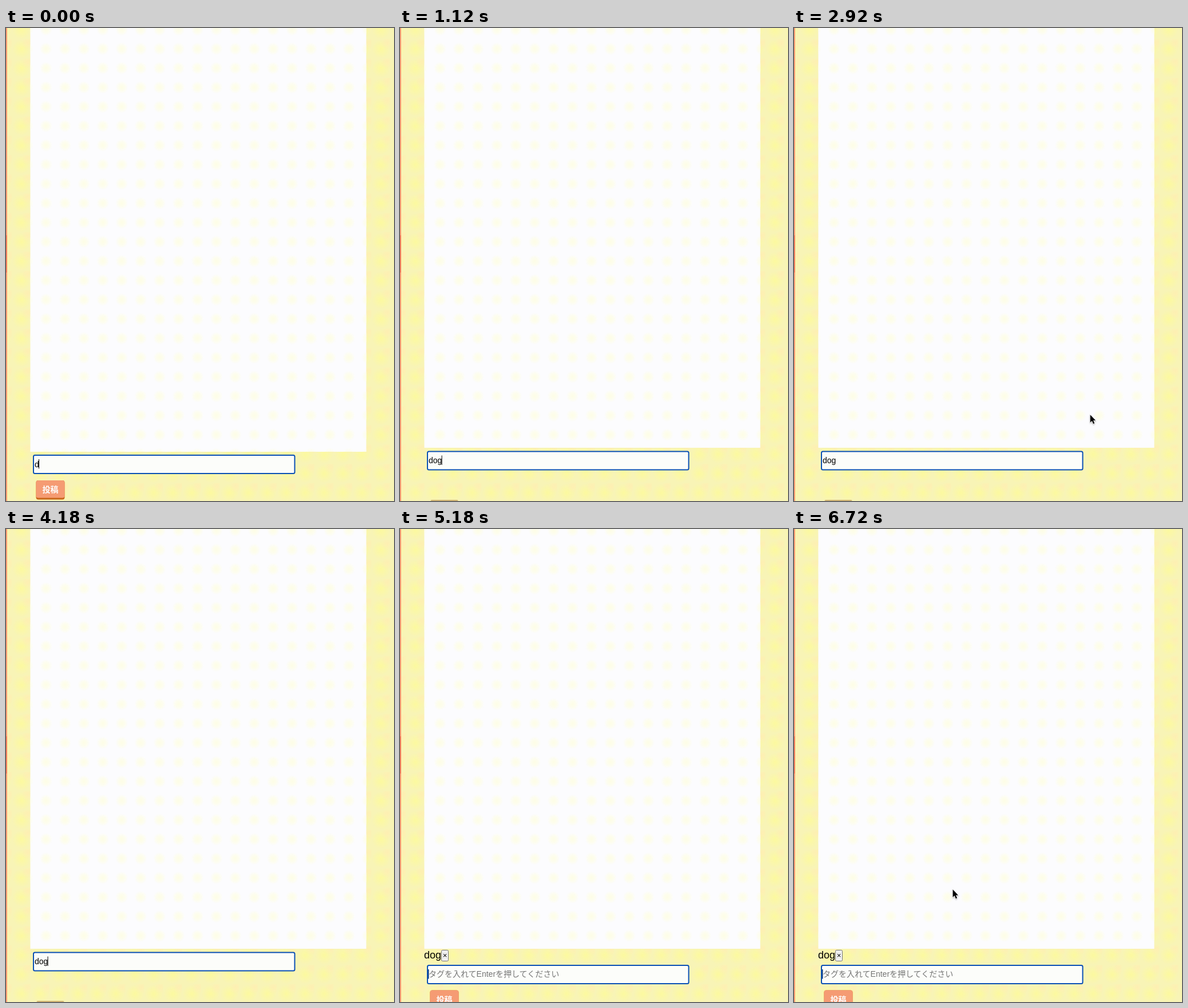
These frames come from a looping animation (678 px wide and 826 px high, 8000 ms). An HTML page:

```html
<!DOCTYPE html>
<html lang="ja">
<head>
<meta charset="utf-8">
<style>
  html, body { margin: 0; width: 100%; height: 100%; overflow: hidden; background: #f8f4b6; }
  svg { display: block; width: 678px; height: 826px; }
  text { font: 14px "Liberation Sans", "Noto Sans CJK JP", "Noto Sans CJK", sans-serif; }
  #tag text { font-size: 18px; }
  #tag .x { font-size: 13px; text-anchor: middle; }
  #button text { font-weight: bold; fill: #fff; text-anchor: middle; }
</style>
</head>
<body>
<svg viewBox="0 0 678 826">
  <defs>
    <radialGradient id="yellow">
      <stop offset="0" stop-color="#fcf99f"/>
      <stop offset="1" stop-color="#fcf99f" stop-opacity="0"/>
    </radialGradient>
    <radialGradient id="peach">
      <stop offset="0" stop-color="#feefb2"/>
      <stop offset="1" stop-color="#feefb2" stop-opacity="0"/>
    </radialGradient>
    <radialGradient id="pale">
      <stop offset="0" stop-color="#fdfde6"/>
      <stop offset=".5" stop-color="#fdfdee"/>
      <stop offset="1" stop-color="#fdfdee" stop-opacity="0"/>
    </radialGradient>
    <pattern id="page" x="10" y="19.5" width="33.07" height="33.7" patternUnits="userSpaceOnUse">
      <circle cx="17" cy="17" r="16" fill="url(#yellow)"/>
      <circle cx="28" cy="6" r="11" fill="url(#peach)"/>
    </pattern>
    <pattern id="dots" x="53.5" y="19.5" width="33.07" height="33.7" patternUnits="userSpaceOnUse">
      <circle cx="16.5" cy="16.8" r="11" fill="url(#pale)"/>
    </pattern>
    <filter id="shadow" x="-50%" y="-50%" width="200%" height="200%">
      <feDropShadow dx="0" dy="1.2" stdDeviation="1" flood-opacity=".35"/>
    </filter>
  </defs>

  <rect width="678" height="826" fill="#f8f4b6"/>
  <rect width="678" height="826" fill="url(#page)"/>
  <rect width="2" height="826" fill="#f79b73"/>
  <rect y="362" width="2" height="65" fill="#f17d5c"/>

  <rect class="card" x="42.5" width="587" fill="#fcfcfe"/>
  <rect class="card" x="42.5" width="587" fill="url(#dots)"/>

  <g id="tag">
    <text x="42" y="750">dog</text>
    <rect x="72.5" y="735.5" width="12" height="19" rx="2" fill="#efefef" stroke="#767676"/>
    <text class="x" x="78.5" y="749">×</text>
  </g>

  <g id="field">
    <rect x="48" y="1" width="456.5" height="32" rx="2.5" fill="#fcfdfa" stroke="#0b50b4" stroke-width="2"/>
    <text id="typed" x="50" y="21.5"></text>
    <text id="hint" x="50" y="20.5" fill="#757575">タグを入れてEnterを押してください</text>
    <rect id="caret" y="8" height="16.5"/>
  </g>

  <g id="button">
    <rect x="52.5" width="50" height="33.5" rx="4" fill="#c9661a"/>
    <rect x="52.5" width="50" height="30.5" rx="4" fill="#f59b73"/>
    <text x="77.5" y="21">投稿</text>
  </g>
  <rect id="edge" x="53.5" y="824" width="48" height="4" rx="2" fill="#d0b473"/>

  <path id="pointer" filter="url(#shadow)" stroke="#fff" stroke-width="1.2" paint-order="stroke"
        d="M0 .5V14L3.1 11.2L5.2 16.4L7.5 15.4L5.3 10.4H9.4Z"/>
</svg>
<script>
const LOOP = 8000;
const $ = id => document.getElementById(id);
const cards = document.querySelectorAll('.card');

// Each state holds until the next one starts.
const states = [
  { at: 0,    text: 'd',   card: 740, field: 745, button: 790 },
  { at: 20,   text: 'do',  card: 733, field: 738.5 },
  { at: 1120, text: 'dog', card: 733, field: 738.5 },
  { at: 4200, text: '',    card: 733, field: 761, button: 805.5 }
];

// Caret is hidden inside these intervals.
const caretOff = [[2800, 3780], [6600, 6720]];

// Pointer tracks: [time, x, y]
const tracks = [
  { end: 4160, path: [[2500, 642, 8], [2700, 604, 360], [2920, 518, 675],
                      [3200, 425, 646], [3360, 423, 646], [3780, 423, 646], [4160, -12, -20]] },
  { end: LOOP, path: [[5200, 410, 818], [5460, 338, 690], [5720, 277.5, 629]] }
];

const show = (el, on) => el.setAttribute('visibility', on ? 'visible' : 'hidden');
const place = (el, x, y) => el.setAttribute('transform', `translate(${x} ${y})`);

function pointAt(path, t) {
  const i = path.findIndex(p => p[0] > t);
  if (i < 0) return path[path.length - 1].slice(1);
  const [t0, x0, y0] = path[i - 1], [t1, x1, y1] = path[i];
  const k = (t - t0) / (t1 - t0);
  return [x0 + (x1 - x0) * k, y0 + (y1 - y0) * k];
}

function render(t) {
  const s = states.filter(s => s.at <= t).pop();
  const empty = !s.text;

  cards.forEach(c => c.setAttribute('height', s.card));
  place($('field'), 0, s.field);
  $('typed').textContent = s.text;
  show($('hint'), empty);
  show($('tag'), empty);

  const caret = $('caret');
  caret.setAttribute('x', empty ? 49 : 49.2 + s.text.length * 7.8);
  caret.setAttribute('width', empty ? 1.5 : 1);
  caret.setAttribute('fill', empty ? '#123f7c' : '#000');
  show(caret, !caretOff.some(([a, b]) => t >= a && t < b));

  show($('button'), s.button);
  show($('edge'), !s.button);
  if (s.button) place($('button'), 0, s.button);

  const track = tracks.find(k => t >= k.path[0][0] && t < k.end);
  show($('pointer'), track);
  if (track) place($('pointer'), ...pointAt(track.path, t));
}

const start = performance.now();
function tick() {
  render((performance.now() - start) % LOOP);
  requestAnimationFrame(tick);
}
tick();
</script>
</body>
</html>
```
